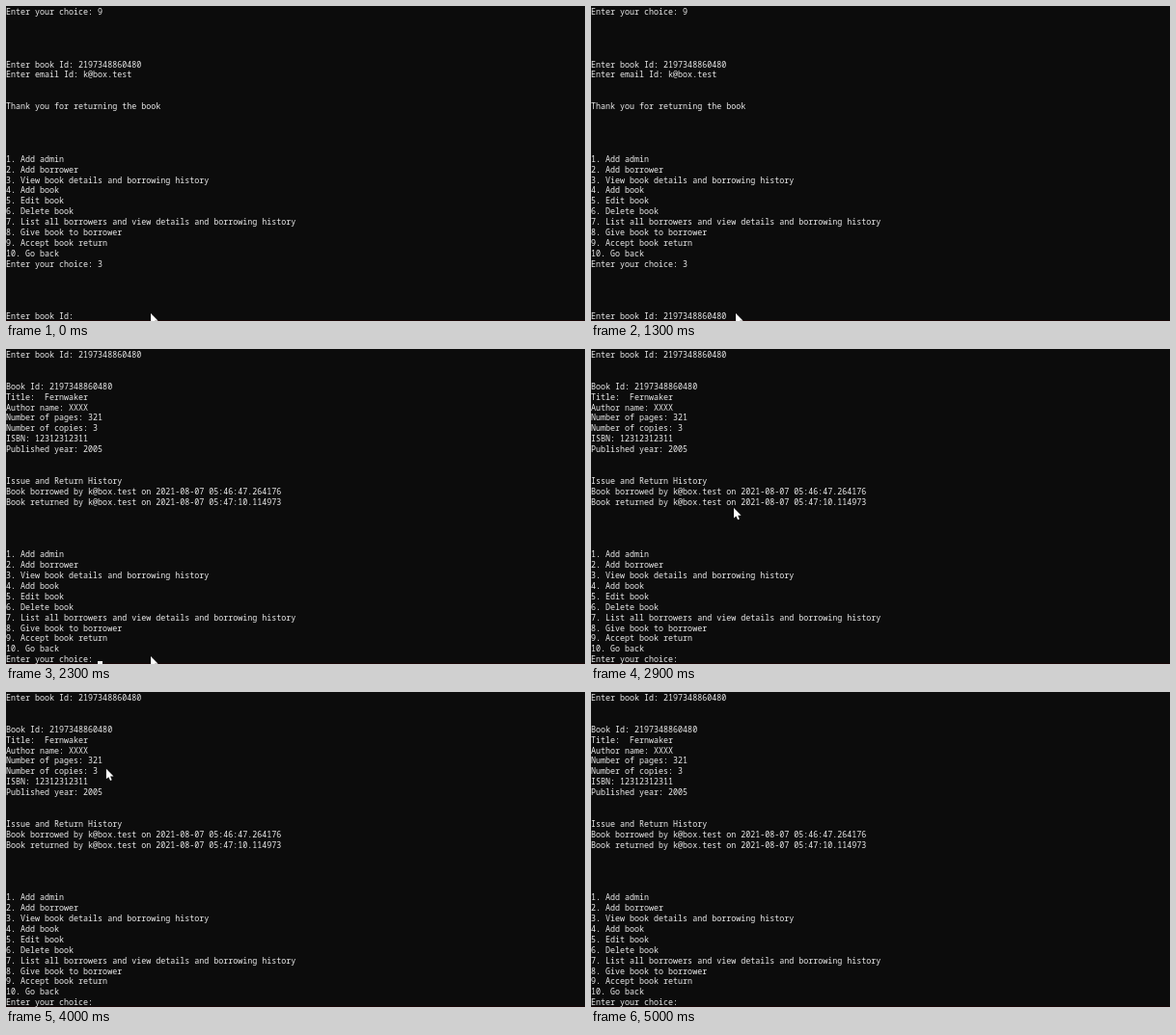
Write an HTML page that moves like this. It is 600x327 px and loops after 5300 ms.

```html
<!DOCTYPE html>
<html lang="en">
<head>
<meta charset="utf-8">
<title>Library console</title>
<style>
  html, body { margin: 0; width: 100%; height: 100%; overflow: hidden; background: #0c0c0c; }
  #stage { position: relative; width: 600px; height: 327px; overflow: hidden; background: #0c0c0c; }
  #stage::before { content: ""; position: absolute; left: 0; right: 0; bottom: 0; height: 1px; background: #170505; }
  pre { position: absolute; left: 0; top: 1px; margin: 0; color: #eee;
        font: 500 8.35px/10.9px "Noto Sans Mono", monospace; font-variant-ligatures: none; }
  #caret { position: absolute; top: 324px; width: 5px; height: 3px; background: #f2f2f2; }
  #pointer { position: absolute; left: 0; top: 0; overflow: visible; }
</style>
</head>
<body>
<div id="stage">
  <pre id="screen"></pre>
  <div id="caret"></div>
  <svg id="pointer" width="9" height="13">
    <path d="M0 0V10.5L2.4 8.4L4.2 12.2L5.8 11.4L4.2 7.8H7.6Z" fill="#fff"/>
  </svg>
</div>
<script>
const LOOP = 5300, STEP = 100, CHAR_WIDTH = 5;
const PASTE = 900, ENTER = 2300;
const BLINK = 533, FIRST_BLINK = 167;
const BOOK_ID = "2197348860480", EMAIL = "k@box.test";
const screen = document.getElementById("screen");
const caret = document.getElementById("caret");
const pointer = document.getElementById("pointer");

const SMALL_GAP = "\n".repeat(3), LARGE_GAP = "\n".repeat(5);

const menu = [
  "Add admin", "Add borrower", "View book details and borrowing history",
  "Add book", "Edit book", "Delete book",
  "List all borrowers and view details and borrowing history",
  "Give book to borrower", "Accept book return", "Go back"
].map((label, i) => `${i + 1}. ${label}\n`).join("") + "Enter your choice: ";

const prompt = [
  "Enter your choice: 9",
  `Enter book Id: ${BOOK_ID}\nEnter email Id: ${EMAIL}${SMALL_GAP}Thank you for returning the book`,
  menu + "3",
  "Enter book Id: "
].join(LARGE_GAP);

const book = `Book Id: ${BOOK_ID}
Title:  Fernwaker
Author name: XXXX
Number of pages: 321
Number of copies: 3
ISBN: 12312312311
Published year: 2005`;

const history = `Issue and Return History
Book borrowed by ${EMAIL} on 2021-08-07 05:46:47.264176
Book returned by ${EMAIL} on 2021-08-07 05:47:10.114973`;

const details = [`Enter book Id: ${BOOK_ID}`, book, history].join(SMALL_GAP) + LARGE_GAP + menu;

// The pointer rests between sweeps; each sweep is a quadratic curve.
const sweeps = [
  { start: 2600, end: 2900, from: [150, 319], bend: [390, -75], to: [148, 165] },
  { start: 3300, end: 3600, from: [148, 165], bend: [115, 150], to: [82, 135] },
  { start: 3800, end: 4400, from: [82, 135], bend: [133, 48], to: [75, -14] }
];

function pointerAt(t) {
  const { start, end, from, bend, to } = sweeps.findLast(s => s.start <= t) ?? sweeps[0];
  const u = Math.min(1, Math.max(0, (t - start) / (end - start)));
  return from.map((a, i) => (1 - u) ** 2 * a + 2 * u * (1 - u) * bend[i] + u * u * to[i]);
}

function textAt(t) {
  if (t >= ENTER) return details;
  return t >= PASTE ? prompt + BOOK_ID : prompt;
}

// Every blink tick toggles the caret, and so does each input.
function caretVisible(t) {
  const ticks = Math.floor((t - FIRST_BLINK) / BLINK) + 1;
  const inputs = (t >= PASTE) + (t >= ENTER);
  return (ticks + inputs) % 2 === 1;
}

function draw(now) {
  const t = Math.floor(now % LOOP / STEP) * STEP;
  const text = textAt(t);
  if (screen.textContent !== text) screen.textContent = text;

  const column = text.length - text.lastIndexOf("\n") - 1;
  caret.style.left = column * CHAR_WIDTH + "px";
  caret.style.visibility = caretVisible(t) ? "visible" : "hidden";

  const [x, y] = pointerAt(t);
  pointer.style.transform = `translate(${x}px, ${y}px)`;
  requestAnimationFrame(draw);
}
draw(performance.now());
</script>
</body>
</html>
```
